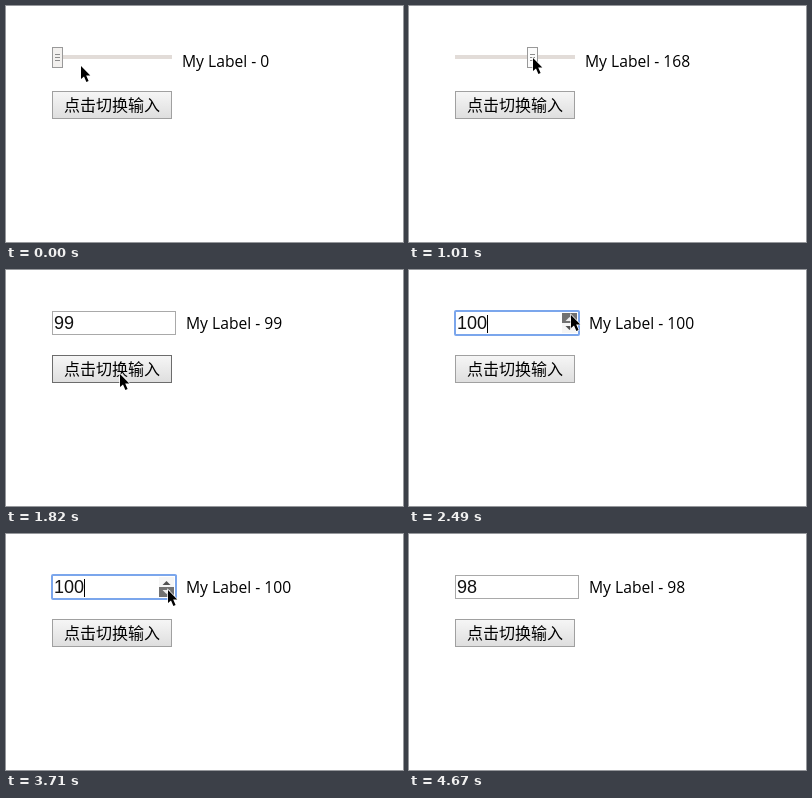
These frames come from a looping animation (397x236 px, 4.71 s). An HTML page:

```html
<!DOCTYPE html>
<html lang="zh">
<head>
<meta charset="utf-8">
<title>Slider and number input</title>
<style>
html, body { margin: 0; width: 100%; height: 100%; overflow: hidden; background: #fff; }
svg { display: block; }
.label { font: 15.65px "Open Sans", sans-serif; }
.field { font: 18px "Liberation Sans", Arial, sans-serif; fill: #111; }
.caption { font: 16px "Noto Sans CJK SC", "Noto Sans CJK", sans-serif; }
</style>
</head>
<body>
<svg width="397" height="236" viewBox="0 0 397 236">
  <defs>
    <linearGradient id="face" x2="0" y2="1">
      <stop offset="0" stop-color="#f6f6f6"/>
      <stop offset=".38" stop-color="#ededed"/>
      <stop offset="1" stop-color="#dedede"/>
    </linearGradient>
  </defs>
  <rect width="397" height="236" fill="#fff"/>

  <g id="slider">
    <rect x="46" y="49" width="120" height="4" fill="#e2dcd8"/>
    <g id="thumb">
      <rect id="thumbFace" x=".5" y="41.5" width="10" height="20" stroke="#999"/>
      <path d="M3 48.5h5M3 51.5h5M3 54.5h5" stroke="#8c8c8c"/>
    </g>
  </g>

  <g id="number">
    <rect x="46.5" y="41.5" width="123" height="23" fill="#fff" stroke="#a9a9a9"/>
    <rect id="ring" x="46" y="41" width="124" height="24" rx="1" fill="none" stroke="#7ba6ec" stroke-width="2"/>
    <text id="fieldText" class="field" x="48" y="59"></text>
    <path id="caret" stroke="#000" d="M0 45v18"/>
    <g id="spinner">
      <rect id="upFace" x="153" y="43" width="15" height="10"/>
      <path id="upArrow" d="M156.5 51l4-4 4 4z"/>
      <rect id="downFace" x="153" y="53" width="15" height="10"/>
      <path id="downArrow" d="M156.5 56l4 4 4-4z"/>
    </g>
  </g>

  <text id="label" class="label"></text>

  <rect id="button" x="46.5" y="85.5" width="119" height="27" fill="url(#face)"/>
  <text class="caption" x="58" y="105">点击切换输入</text>

  <path id="cursor" d="M0 0V13L3 10.4 5.4 16 7.6 15 5.2 9.6H9.3Z" stroke="#fff" stroke-width="1.4" paint-order="stroke"/>
</svg>
<script>
const LOOP = 4710;
const $ = id => document.getElementById(id);
const set = (id, attrs) => {
  for (const name in attrs) $(id).setAttribute(name, attrs[name]);
};
const show = (id, on) => set(id, { visibility: on ? "inherit" : "hidden" });

// time, x, y of the pointer tip
const pointer = [
  [0, 75, 60], [150, 68, 58], [270, 61, 56], [420, 52, 51], [580, 50, 52],
  [730, 86, 51], [880, 116, 52], [1010, 124, 52], [1160, 108, 54],
  [1290, 96, 55], [1430, 94, 57], [1560, 105, 82], [1680, 114, 104],
  [1950, 140, 78], [2070, 163, 54], [2220, 162, 49], [2340, 162, 45],
  [3030, 162, 50], [3150, 162, 56], [4010, 171, 72], [4140, 209, 112],
  [4280, 284, 170], [4410, 352, 222], [4550, 352, 250]
];

// time, value
const values = [
  [0, 0], [730, 48], [880, 120], [1010, 168], [1160, 140], [1290, 104],
  [1430, 99], [2490, 100], [2610, 101], [2760, 102], [2910, 103],
  [3430, 102], [3580, 101], [3710, 100], [3860, 99], [4010, 98]
];

// time, state of the up half, state of the down half
const spins = [
  [0, "none", "none"], [2070, "idle", "hover"], [2220, "hover", "idle"],
  [2490, "press", "idle"], [3030, "hover", "idle"], [3150, "idle", "hover"],
  [3710, "idle", "press"], [3860, "plain", "hover"], [4010, "plain", "plain"],
  [4670, "none", "none"]
];

const faces = { none: "#fff", plain: "#fff", idle: "#f5f5f5", hover: "#dcdcdc", press: "#717171" };

const latest = (rows, t) => rows.findLast(row => row[0] <= t);
const within = (t, from, to) => t >= from && t < to;

function paintSpin(side, state) {
  set(side + "Face", { fill: faces[state] });
  set(side + "Arrow", { fill: state === "press" ? "#eee" : "#505050" });
}

function draw(t) {
  const [, x, y] = latest(pointer, t);
  const [, value] = latest(values, t);
  const [, up, down] = latest(spins, t);
  const typing = t >= 1820;
  const focused = within(t, 2490, 4670);

  show("slider", !typing);
  show("number", typing);
  set("thumb", { transform: `translate(${46 + Math.round(value * 109 / 255)} 0)` });
  set("thumbFace", { fill: t < 420 ? "#f2f0ee" : "#fcfcfc" });

  $("fieldText").textContent = value;
  const caretX = 48.5 + 10 * String(value).length;
  set("caret", { transform: `translate(${caretX} 0)` });
  show("ring", typing && focused);
  show("caret", typing && focused);
  show("spinner", typing && up !== "none");
  paintSpin("up", up);
  paintSpin("down", down);

  $("label").textContent = "My Label - " + value;
  set("label", typing ? { x: 180, y: 59 } : { x: 176, y: 61 });
  set("button", { stroke: within(t, 1680, 1950) ? "#6c6c6c" : "#a0a0a0" });
  set("cursor", { transform: `translate(${x} ${y})` });
}

function tick() {
  draw(performance.now() % LOOP);
  requestAnimationFrame(tick);
}
tick();
</script>
</body>
</html>
```
